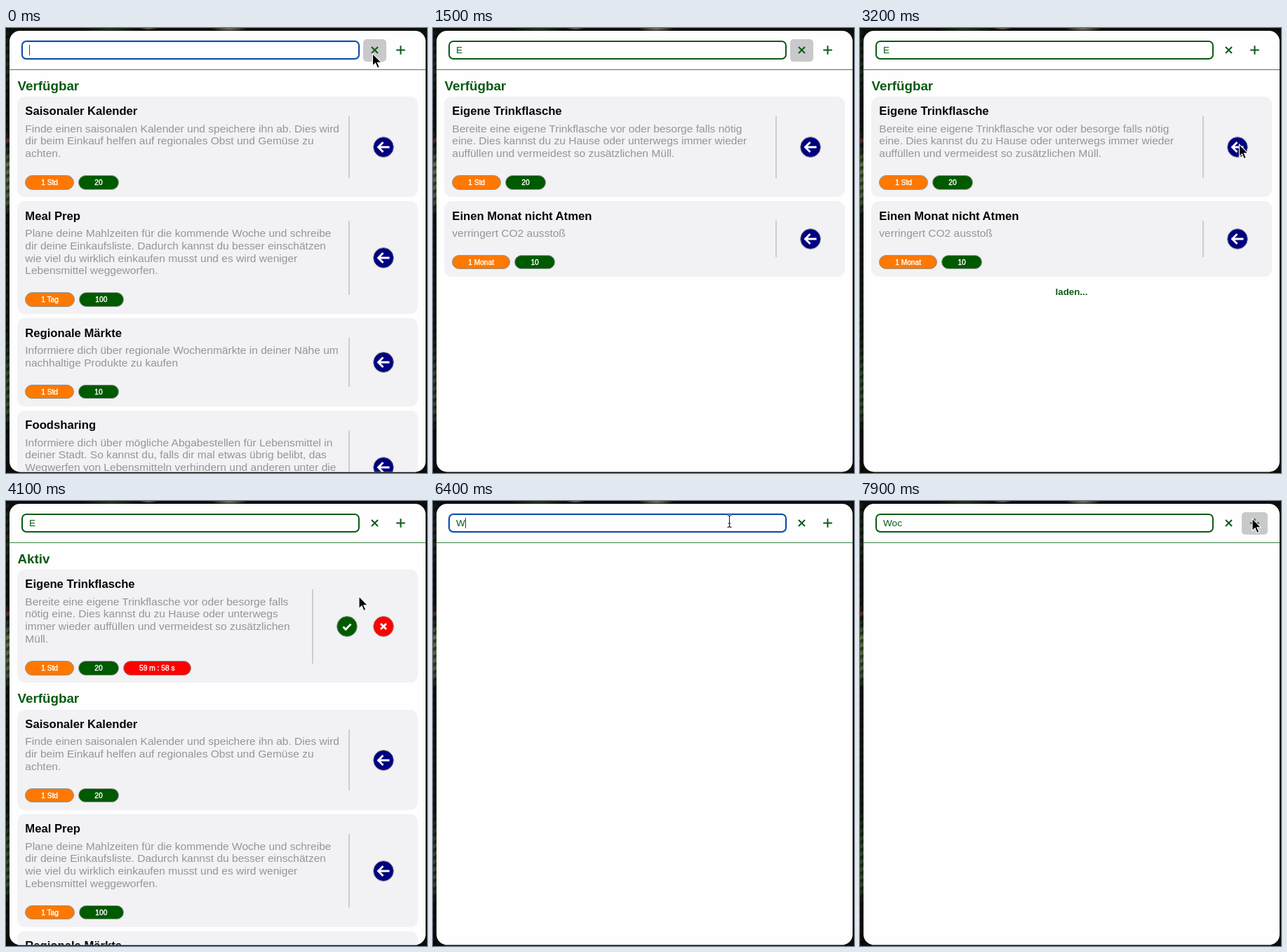
Write an HTML page that moves like this. It is 600 px wide and 635 px high and loops after 8 s.

```html
<!DOCTYPE html>
<html lang="de">
<head>
<meta charset="utf-8">
<title>Aufgaben</title>
<style>
html, body { margin: 0; width: 100%; height: 100%; overflow: hidden; }
body { font-family: "Liberation Sans", Arial, sans-serif; }
#stage {
  position: absolute; inset: 0; width: 600px; height: 635px; overflow: hidden;
  background:
    radial-gradient(ellipse 14px 3px at 203px 0, #8a6a64, transparent),
    radial-gradient(ellipse 26px 4px at 318px 1px, #7d7866, transparent),
    radial-gradient(ellipse 40px 5px at 150px 2px, #26331f, transparent),
    linear-gradient(90deg, transparent 5px, #0b0e0b 5px),
    repeating-linear-gradient(155deg, #0007 0 3px, #0000 6px 10px),
    linear-gradient(#121812, #202b1e 60px, #0c100c 100px, #10150f 150px, #54302c 160px, #151b13 168px,
      #5b6b46 195px, #46573a 245px, #0d130d 268px, #111a11 440px, #2d4429 490px, #33482c 545px, #0b0f0b 575px);
}
#panel { position: absolute; inset: 0; background: #fefefe; clip-path: inset(4px 2px 1.5px 5px round 15px); }
#field {
  position: absolute; left: 22px; top: 18px; width: 482px; height: 27px; box-sizing: border-box;
  border: 2px solid #0a5a14; border-radius: 7px; padding-left: 9px;
  font-size: 13.6px; line-height: 23px; color: #0a5a14; white-space: nowrap;
}
#field.focus { border-color: #0f4fa8; box-shadow: 0 0 1px 1px #c9dcf2; }
#caret { display: inline-block; width: 1px; height: 15px; vertical-align: -3px; background: #0a5a14; }
.hover { position: absolute; top: 15.5px; height: 32px; border-radius: 5px; background: #c9c8ca; }
#hoverClear { left: 509px; width: 33px; }
#hoverAdd { left: 544px; width: 37px; }
#icons, #cursor { position: absolute; left: 0; top: 0; width: 600px; height: 635px; }
#rule { position: absolute; left: 0; right: 0; top: 59px; height: 1px; background: #3c8446; }
.view { position: absolute; left: 0; top: 59.5px; width: 600px; }
h2 { margin: 0; padding-left: 16.5px; height: 38.5px; font-size: 18.8px; line-height: 45px; color: #0a5a14; }
.card { position: relative; margin: 0 13.5px 6px 16px; border-radius: 11px; background: #f2f1f4; }
.card + h2 { margin-top: -6px; }
h3 { position: absolute; left: 11.3px; top: 11.4px; margin: 0; font-size: 16.65px; line-height: 20px; color: #060606; white-space: nowrap; }
p { position: absolute; left: 11.3px; top: 36.7px; margin: 0; font-size: 15.56px; line-height: 17.8px; color: #959497; white-space: pre; }
.pills { position: absolute; left: 11px; bottom: 10.6px; display: flex; gap: 6px; }
.pill {
  box-sizing: border-box; height: 20.5px; padding: 0 22.2px; border: 1px solid #8c9590; border-radius: 11px;
  font-size: 10.2px; line-height: 19px; color: #fff; white-space: nowrap; -webkit-text-stroke: .4px #fff;
}
.bar { position: absolute; top: 28px; bottom: 27.5px; width: 2px; background: #cccbcd; }
.button { position: absolute; top: calc(50% + .3px); width: 32px; height: 32px; margin: -16px; }
.loading { line-height: 32px; padding-left: 3px; font-size: 13.3px; font-weight: bold; text-align: center; color: #0a5a14; }
</style>
</head>
<body>
<div id="stage">
  <div id="panel">
    <div id="field"><span id="typed"></span><span id="caret"></span></div>
    <div class="hover" id="hoverClear"></div>
    <div class="hover" id="hoverAdd"></div>
    <svg id="icons" fill="none" stroke="#0a5a14" stroke-width="2">
      <path d="M521 27l9 9m0-9l-9 9M556.2 31.5h12.6m-6.3-6.3v12.6"/>
    </svg>
    <div id="rule"></div>
    <div id="views"></div>
  </div>
  <svg id="cursor">
    <path id="arrow" d="M0 0v17.6l4-3.8 2.9 6.6 2.9-1.2-2.9-6.5h5.5z" fill="#000" stroke="#fff" stroke-width="1.1"/>
    <g id="beam" fill="none">
      <path d="M-3-8.5q3 0 3 2v13q0 2-3 2M3-8.5q-3 0-3 2v13q0 2 3 2M-2 3h4" stroke="#fff" stroke-width="2.6"/>
      <path d="M-3-8.5q3 0 3 2v13q0 2-3 2M3-8.5q-3 0-3 2v13q0 2 3 2M-2 3h4" stroke="#222" stroke-width="1.1"/>
    </g>
  </svg>
</div>
<script>
const LOOP = 8000;
const $ = id => document.getElementById(id);

const ICONS = {
  start: ['#000080', 'M24.5 16H9M15.5 9L8.5 16l7 7'],
  done: ['#005a00', 'M10.5 16.5l3.7 3.7 7.3-7.6'],
  cancel: ['#ff0000', 'M12 12l8 8m0-8l-8 8'],
};

const pill = (color, text, extra = '') => `<span class="pill" style="background:${color}" ${extra}>${text}</span>`;

const button = (kind, x) => {
  const [color, mark] = ICONS[kind];
  return `<svg class="button" style="left:${x}px">
    <circle cx="16" cy="16" r="14.4" fill="${color}" stroke="#8f9a94"/>
    <path d="${mark}" fill="none" stroke="#fff" stroke-width="2.8"/></svg>`;
};

function card({ title, lines, time, points }, active = false) {
  const height = 89.9 + 17.8 * lines.length;
  return `<div class="card" style="height:${height}px">
    <h3>${title}</h3><p>${lines.join('\n')}</p>
    <div class="pills">${pill('#ff7800', time)}${pill('#005a00', points)}${active ? pill('#ff0000', '', 'id="timer"') : ''}</div>
    <div class="bar" style="left:${active ? 419.5 : 471.5}px"></div>
    ${active ? button('done', 470) + button('cancel', 522) : button('start', 522)}</div>`;
}

const calendar = {
  title: 'Saisonaler Kalender', time: '1 Std', points: 20,
  lines: ['Finde einen saisonalen Kalender und speichere ihn ab. Dies wird',
    'dir beim Einkauf helfen auf regionales Obst und Gemüse zu', 'achten.'],
};
const mealPrep = {
  title: 'Meal Prep', time: '1 Tag', points: 100,
  lines: ['Plane deine Mahlzeiten für die kommende Woche und schreibe',
    'dir deine Einkaufsliste. Dadurch kannst du besser einschätzen',
    'wie viel du wirklich einkaufen musst und es wird weniger', 'Lebensmittel weggeworfen.'],
};
const markets = {
  title: 'Regionale Märkte', time: '1 Std', points: 10,
  lines: ['Informiere dich über regionale Wochenmärkte in deiner Nähe um', 'nachhaltige Produkte zu kaufen'],
};
const sharing = {
  title: 'Foodsharing', time: '1 Tag', points: 50,
  lines: ['Informiere dich über mögliche Abgabestellen für Lebensmittel in',
    'deiner Stadt. So kannst du, falls dir mal etwas übrig belibt, das',
    'Wegwerfen von Lebensmitteln verhindern und anderen unter die', 'Arme greifen.'],
};
const bottle = {
  title: 'Eigene Trinkflasche', time: '1 Std', points: 20,
  lines: ['Bereite eine eigene Trinkflasche vor oder besorge falls nötig',
    'eine. Dies kannst du zu Hause oder unterwegs immer wieder', 'auffüllen und vermeidest so zusätzlichen Müll.'],
};
const activeBottle = {
  ...bottle,
  lines: ['Bereite eine eigene Trinkflasche vor oder besorge falls', 'nötig eine. Dies kannst du zu Hause oder unterwegs',
    'immer wieder auffüllen und vermeidest so zusätzlichen', 'Müll.'],
};
const breath = { title: 'Einen Monat nicht Atmen', time: '1 Monat', points: 10, lines: ['verringert CO2 ausstoß'] };

const cards = list => list.map(item => card(item)).join('');
const available = list => '<h2>Verfügbar</h2>' + cards(list);
const everything = [calendar, mealPrep, markets, sharing];
const found = available([bottle, breath]);
const views = {
  all: available(everything),
  found,
  loading: found + '<div class="loading">laden...</div>',
  active: '<h2>Aktiv</h2>' + card(activeBottle, true) + available(everything),
  empty: '',
};
$('views').innerHTML = Object.entries(views)
  .map(([name, html]) => `<div class="view" id="view-${name}">${html}</div>`).join('');

// Each step: start time, value
const viewSteps = [[0, 'all'], [800, 'found'], [2900, 'loading'], [3400, 'active'], [6300, 'empty']];
const textSteps = [[0, ''], [800, 'E'], [5400, ''], [6300, 'W'], [6600, 'Wo'], [6800, 'Woc']];
const focusSteps = [[0, true], [1200, false], [5000, true], [7000, false]];
const shownSteps = [[0, true], [800, false], [2000, true]];
const path = [
  [0, 522.5, 36.5], [2000, 522.5, 36.5], [2300, 546, 95], [2700, 540.5, 166], [3900, 540.5, 166], [4100, 503, 136],
  [4700, 423.5, 30], [6000, 423.5, 30], [6300, 422.5, 29], [7150, 422.5, 29], [7500, 508, 29], [7600, 508, 29],
  [7800, 559, 25], [8000, 559, 25],
];

const current = (steps, t) => steps.filter(step => step[0] <= t).pop();
const valueAt = (steps, t) => current(steps, t)[1];

function pointerAt(t) {
  const i = Math.max(1, path.findIndex(point => point[0] > t));
  const [t0, x0, y0] = path[i - 1], [t1, x1, y1] = path[i];
  const u = (t - t0) / (t1 - t0), e = u * u * (3 - 2 * u);
  return [x0 + (x1 - x0) * e, y0 + (y1 - y0) * e];
}

const show = (el, on) => { el.style.display = on ? '' : 'none'; };

function draw(t) {
  const view = valueAt(viewSteps, t);
  for (const name in views) show($('view-' + name), name === view);

  const [since, text] = current(textSteps, t);
  const focus = valueAt(focusSteps, t);
  $('typed').textContent = text;
  $('field').classList.toggle('focus', focus);
  show($('caret'), focus && (t - since) % 400 < 200);

  const second = 59 - Math.max(0, Math.floor((t - 3400) / 400));
  $('timer').textContent = `59 m : ${second} s`;

  const [x, y] = pointerAt(t);
  const inBar = y > 15 && y < 48;
  const overField = inBar && x > 22 && x < 504;
  show($('hoverClear'), inBar && x >= 509 && x < 542);
  show($('hoverAdd'), inBar && x >= 544 && x < 581);
  show($('cursor'), valueAt(shownSteps, t));
  show($('arrow'), !overField);
  show($('beam'), overField);
  for (const id of ['arrow', 'beam']) $(id).setAttribute('transform', `translate(${x} ${y})`);
}

const start = performance.now();
function tick() {
  draw((performance.now() - start) % LOOP);
  requestAnimationFrame(tick);
}
tick();
</script>
</body>
</html>
```
